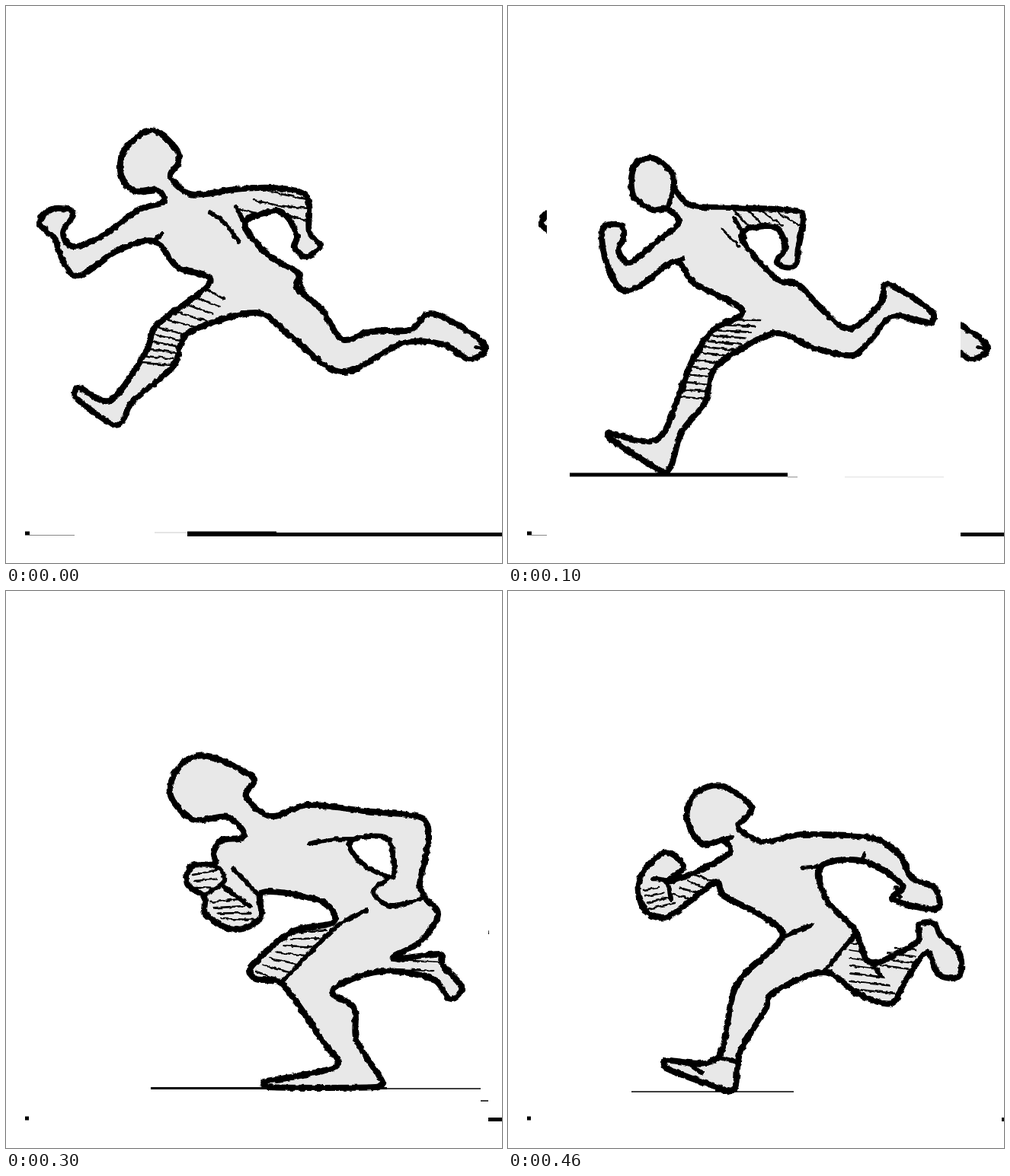
Write an HTML page that moves like this. It is 651 px wide and 732 px high and loops after 0.5 s.

```html
<!DOCTYPE html>
<html lang="en">
<head>
<meta charset="utf-8">
<title>Runner</title>
<style>
html, body { margin: 0; width: 100%; height: 100%; overflow: hidden; background: #fff; }
svg { display: block; width: 651px; height: 732px; }
path { fill: none; stroke: #000; stroke-linecap: round; stroke-linejoin: round; }
.body { fill: #e8e8e8; stroke-width: 8px; }
.hole { fill: #fff; stroke-width: 7px; }
.ink { stroke-width: 6px; }
.hatch { stroke-width: 2.6px; }
</style>
</head>
<body>
<svg id="stage" viewBox="0 0 651 732">
  <filter id="rough" filterUnits="userSpaceOnUse" x="0" y="0" width="651" height="732" color-interpolation-filters="sRGB">
    <feTurbulence type="fractalNoise" baseFrequency=".14" numOctaves="2" seed="4"/>
    <feDisplacementMap in="SourceGraphic" scale="5" xChannelSelector="R" yChannelSelector="G"/>
  </filter>
</svg>
<script>
const STEP = 100;
const stage = document.getElementById('stage');
let group, figure;

function add(parent, tag, attrs) {
  const el = document.createElementNS('http://www.w3.org/2000/svg', tag);
  for (const key in attrs) el.setAttribute(key, attrs[key]);
  return parent.appendChild(el);
}

// Smooth curve through "x y x y ..." points
function curve(text, closed) {
  const pts = text.match(/\S+ \S+/g).map(p => p.split(' ').map(Number));
  const count = pts.length;
  const at = i => pts[closed ? (i + count) % count : Math.max(0, Math.min(count - 1, i))];
  let d = 'M' + pts[0];
  for (let i = 0; i < (closed ? count : count - 1); i++) {
    const [a, b, c, e] = [at(i - 1), at(i), at(i + 1), at(i + 2)];
    // Handles stay short next to long neighbours so that corners do not bulge
    const len = Math.hypot(c[0] - b[0], c[1] - b[1]);
    const handle = (p, q) => Math.min(1 / 6, len * .33 / (Math.hypot(q[0] - p[0], q[1] - p[1]) || 1));
    const out = handle(a, c), into = handle(b, e);
    d += 'C' + b.map((v, k) => v + (c[k] - a[k]) * out) + ' ' + c.map((v, k) => v - (e[k] - b[k]) * into) + ' ' + c;
  }
  return d;
}

const shape = (name, d) => add(figure, 'path', { class: name, d });
const body = (...limbs) => shape('body', curve(limbs.join(' '), true));
const hole = points => shape('hole', curve(points, true));
const ink = (...lines) => lines.forEach(points => shape('ink', curve(points)));

// Even lines from the first to the last, each given by its two ends
function hatch(count, first, last) {
  const a = first.split(' ').map(Number), b = last.split(' ').map(Number);
  for (let i = 0; i < count; i++) {
    const [x, y, x2, y2] = a.map((v, k) => v + (b[k] - v) * i / (count - 1));
    shape('hatch', `M${x} ${y}L${x2} ${y2}`);
  }
}

function floor(left, right, y, height, fill = '#000') {
  add(group, 'rect', { x: left, y: y - height / 2, width: right - left, height, fill });
}

// Clears a strip of the leap, which stays behind all other poses
function wipe(left, right) {
  add(group, 'rect', { x: left, width: right - left, height: 732, fill: '#fff' }).after(figure);
}

function leap() {
  body('190 163 222 186 227 205 216 224 239 246 262 247 300 241',
    '350 239 390 246 398 262 398 297 412 315 394 329 378 316 382 303 370 278 354 269 313 286',
    '345 328 384 351 381 370',
    '415 399 441 438 480 427 530 426 558 404 612 431 630 451 607 464 575 445 520 443 441 481 375 435 328 403',
    '238 431 220 473 165 521 153 546 140 550 92 515 95 501 137 518 185 452 196 421 268 363',
    '225 343 194 309',
    '145 322 94 355 70 325 65 307 44 285 60 267 88 271 75 298 88 316 125 303 175 267 206 258',
    '199 242 168 243 151 222 155 190');
  ink('268 272 285 283 306 310', '194 309 204 300', '302 264 318 295', '384 355 392 380', '617 448 630 451');
  hatch(3, '342 243 394 254', '308 267 340 275');
  hatch(2, '355 262 397 266', '364 274 396 282');
  hatch(5, '262 372 286 385', '210 412 256 424');
  hatch(6, '201 423 232 431', '178 469 216 472');
  floor(238, 651, 694.5, 5);
  floor(238, 355, 692, 3);
  floor(25, 31, 693, 5);
  floor(31, 90, 695.5, 1, '#888');
  floor(195, 238, 692, 1, '#ccc');
}

function land() {
  wipe(51, 594);
  body('190 200 216 220 218 238 240 262 295 265',
    '383 270 386 290 381 318 376 342 353 338 364 315 348 290 306 302',
    '353 359 381 366',
    '410 396 448 424 490 390 498 365 557 402 554 417 505 408 475 440 452 459 400 449 352 430',
    '290 460 268 482 258 522 228 560 214 605 203 612 132 567 132 561 195 570 225 510 242 466 270 425 308 400',
    '245 365 219 336',
    '175 367 148 372 127 330 125 292 148 288 152 304 145 322 160 337 197 308 224 285',
    '209 267 190 268 164 248 166 210');
  ink('218 238 209 267', '219 336 230 332', '297 279 311 304', '440 420 451 426');
  hatch(2, '281 293 303 316', '281 293 303 316');
  hatch(4, '297 269 318 292', '350 269 382 288');
  hatch(7, '288 412 332 413', '250 455 292 460');
  hatch(6, '244 465 276 469', '228 514 258 516');
  floor(81, 367, 616, 5);
  floor(367, 380, 619, 1, '#888');
  floor(442, 572, 619, 1, '#ddd');
}

function push() {
  wipe(30, 603);
  body('220 254 250 270 245 299 325 329',
    '376 337 368 378',
    '375 397 412 415 417 450',
    '436 512 475 531 500 570 556 604 530 643 484 645 507 618 485 588 402 538 370 498 351 456',
    '315 464 275 466 283 530 270 541 195 519 205 513 247 503 227 446 262 430 324 424',
    '295 403 260 390',
    '248 418 215 412 176 389 180 361 202 363 195 380 228 388 226 345 252 325',
    '238 312 205 318 184 286 195 262');
  ink('265 355 262 372 258 395', '325 329 345 350 372 385', '312 415 330 428', '324 459 354 457');
  hatch(5, '336 338 375 342', '363 372 370 373');
  hatch(5, '308 424 338 447', '233 443 273 460');
  hatch(6, '236 464 272 467', '246 507 278 515');
  hatch(2, '215 515 279 524', '240 525 279 531');
  floor(137, 583, 648, 3);
}

function crouch() {
  wipe(30, 633);
  body('265 217 325 246 315 270 348 296 395 281 470 289',
    '545 298 555 325 543 385 549 402',
    '567 425 545 460 508 483',
    '570 477 573 492 598 520 583 536 560 510 490 500',
    '428 525 457 548 460 590 494 645 485 652 345 652 338 645 385 637 435 623 418 595 361 515',
    '328 510 320 496 375 448 430 435',
    '415 408 337 396',
    '334 430 300 445 262 425 260 402 238 385 244 361 274 359',
    '272 345 282 328 313 322 291 297 245 300 215 265 232 226');
  hole('452 329 498 324 509 355 505 376 465 356');
  ink('473 420 435 440 361 515', '398 332 425 327 460 326', '505 376 482 395 505 414 549 403',
    '274 359 287 380 260 400', '298 365 334 402', '286 389 320 414');
  hatch(3, '246 373 276 367', '250 389 276 390');
  hatch(4, '268 409 305 405', '284 431 330 432');
  hatch(7, '383 449 420 445', '328 500 364 513');
  hatch(2, '515 485 569 488', '506 497 560 499');
  floor(190, 500, 653.5, 3);
  floor(500, 623, 654, 1.5);
  floor(623, 633, 670, 1.5);
}

function stride() {
  wipe(30, 648);
  body('280 256 320 285 302 310 335 329 385 320',
    '480 325 515 348 530 377 560 390 562 418 505 405 518 387 466 355 411 362',
    '418 405 455 445',
    '477 488 538 460 540 438 560 437 567 452 592 475 592 506 565 504 549 475 520 515 503 542 460 530 414 501',
    '345 530 338 550 305 605 297 655 275 652 207 627 207 617 275 613 300 518 360 455',
    '330 425 282 400 273 382',
    '210 428 180 420 172 380 205 344 230 362 208 382 245 370 291 344',
    '282 328 255 332 235 300 245 267');
  ink('411 362 386 364', '466 356 467 345', '360 455 398 439', '282 328 294 323', '190 378 208 382 214 405',
    '509 390 514 402', '455 452 414 501', '477 488 489 505', '238 622 254 633', '277 613 297 618');
  hatch(4, '178 393 197 390', '184 418 219 410');
  hatch(4, '246 373 268 382', '214 398 245 406');
  hatch(7, '448 462 463 465', '450 523 509 529');
  hatch(4, '508 469 536 472', '482 491 528 497');
  floor(162, 375, 658, 1.5);
  floor(272, 301, 656, 4);
}

const groups = [leap, land, push, crouch, stride].map(pose => {
  group = add(stage, 'g', {});
  figure = add(group, 'g', { filter: 'url(#rough)' });
  pose();
  return group;
});

function draw() {
  const current = Math.floor(performance.now() / STEP) % groups.length;
  groups.forEach((g, i) => { g.style.display = i === 0 || i === current ? '' : 'none'; });
  requestAnimationFrame(draw);
}
draw();
</script>
</body>
</html>
```
